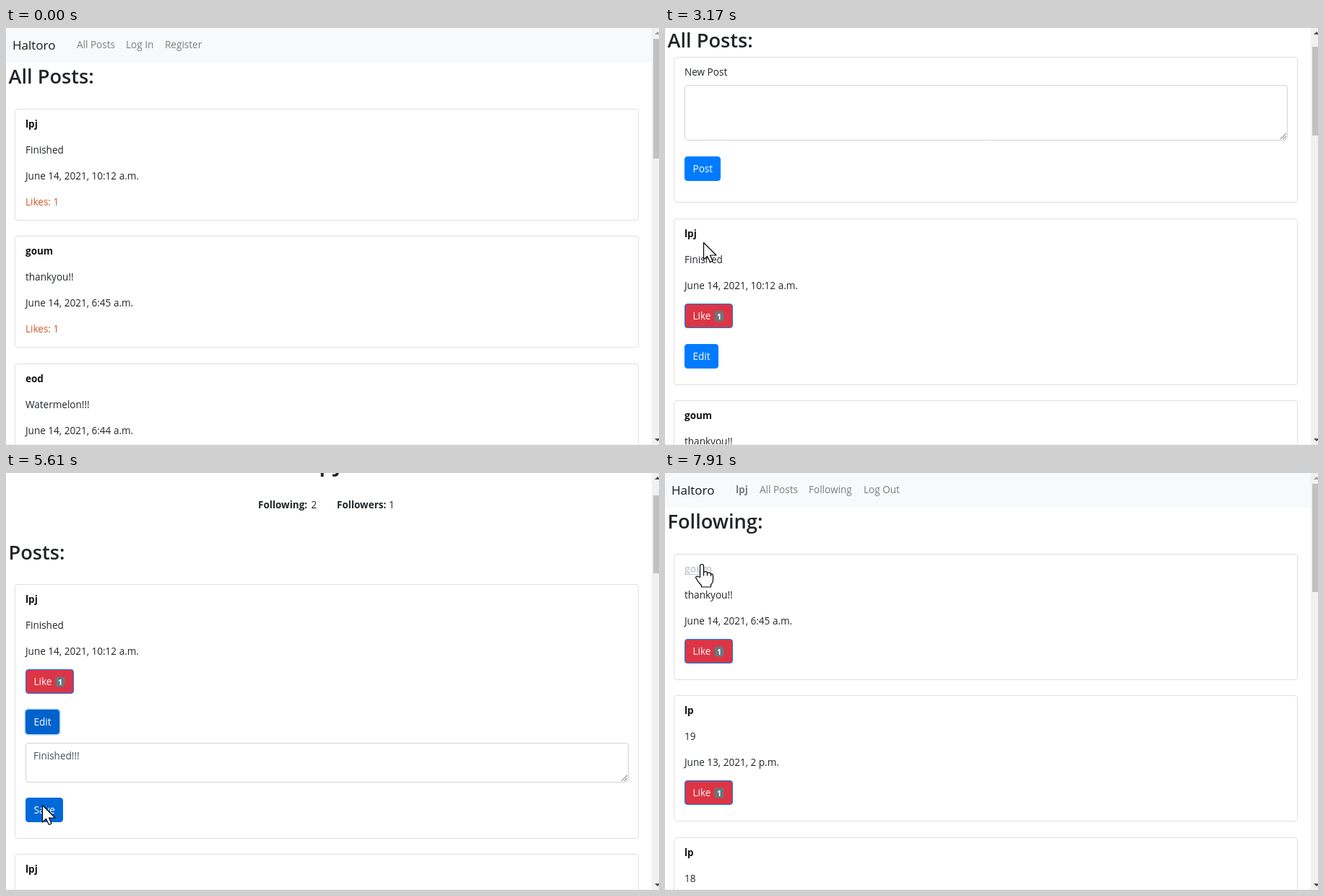
An HTML page with a canvas for the animation above (8 s loop, 904 by 578 pixels).

```html
<!DOCTYPE html>
<html lang="en">
<head>
<meta charset="utf-8">
<title>Social feed walkthrough</title>
<style>
html, body { margin: 0; overflow: hidden; background: #fff; }
canvas { display: block; }
</style>
</head>
<body>
<canvas id="stage" width="904" height="578"></canvas>
<script>
const LOOP = 8000, W = 904, H = 578, NOTCH = 87.4;
const c = document.getElementById('stage').getContext('2d');
const FAMILY = '"Open Sans", "Noto Sans", sans-serif';
const BODY = `13.55px ${FAMILY}`, BOLD = `700 13.5px ${FAMILY}`;
const BRAND = `17px ${FAMILY}`, HEAD = `600 27.2px ${FAMILY}`, TITLE = `600 34px ${FAMILY}`;
const INK = '#212529', BLUE = '#007bff', RED = '#dc3545', GREY = '#6c757d', LINE = '#dfdfdf', FIELD = '#ced4da';
const SITE = 'Haltoro', ME = 'lpj', PAL = 'goum', THIRD = 'eod', OTHER = 'lp';

// Pages: start time, document height (0 = no scrollbar), painter
const pages = [
  [0, 1908, publicFeed], [600, 0, login], [2200, 2575, feed],
  [3800, 2800, profile], [6620, 2575, feed], [7700, 2112, following]
];
// Wheel notches: start time, direction
const wheel = [[3083, 1], [4150, 1], [5980, -1], [6850, 1], [7000, 1], [7260, -1], [7400, -1]];
// Pointer: time, x, y, shape held until the next key
const pointerKeys = [
  [0, 400, 610, 'arrow'], [70, 390, 585, 'arrow'], [480, 182, 22, 'hand'], [700, 182, 22, 'arrow'],
  [860, 137, 100, 'beam'], [1050, 137, 124, 'beam'], [1270, 137, 124, 'arrow'], [1590, 28, 202, 'arrow'],
  [2210, 28, 202, 'arrow'], [2500, 50, 250, 'arrow'], [2720, 50, 250, 'arrow'], [3000, 53, 297, 'arrow'],
  [3200, 53, 297, 'arrow'], [3480, 36, 246, 'hand'], [3800, 36, 246, 'arrow'], [4120, 95, 310, 'arrow'],
  [4370, 95, 325, 'arrow'], [4560, 63, 337, 'arrow'], [5300, 63, 337, 'arrow'], [5600, 50, 460, 'arrow'],
  [5950, 50, 460, 'arrow'], [6360, 89, 25, 'arrow'], [6520, 157, 20, 'hand'], [6660, 157, 20, 'arrow'],
  [7000, 111, 282, 'arrow'], [7400, 111, 282, 'arrow'], [7590, 225, 20, 'hand'], [7720, 225, 20, 'arrow'],
  [7890, 50, 127, 'hand'], [8000, 50, 127, 'hand']
];
const shapes = {
  arrow: new Path2D('M0 0V23.5L5 19L9 27L12.5 25.5L9 17.5H17.5Z'),
  hand: new Path2D('M-2 17V2q0-3 2.5-3t2.5 3v8q4-2 5 1 4-1 5 1.5 3-.5 3 3v5q0 4-3 7v3H0v-2q-5-5-8-11 1-3 4-1zM3 10v5M8 11v4M13 12.5v3'),
  beam: new Path2D('M-7-11h5l2 1 2-1h5M0-11V12M-7 12h5l2-1 2 1h5')
};
const EDIT_PRESS = 4580, EDIT_OPEN = 4700, SAVE = 5750, TYPING = [5120, 5190, 5260];

let now = 0, scrollY = 0, pointer;

const ease = p => { p = Math.min(1, Math.max(0, p)); return p * p * (3 - 2 * p); };

function pointerAt(t) {
  const i = pointerKeys.findIndex(k => k[0] > t) - 1;
  const [t0, x0, y0, shape] = pointerKeys[i], [t1, x1, y1] = pointerKeys[i + 1];
  const p = ease((t - t0) / (t1 - t0));
  return { x: x0 + (x1 - x0) * p, y: y0 + (y1 - y0) * p, shape };
}

function text(s, x, y, font = BODY, color = INK, align = 'left') {
  c.font = font; c.fillStyle = color; c.textAlign = align;
  c.fillText(s, x, y);
  return c.measureText(s).width;
}

function rect(x, y, w, h, color) { c.fillStyle = color; c.fillRect(x, y, w, h); }

function box(x, y, w, h, fill, stroke, r = 3.5) {
  c.beginPath(); c.roundRect(x + .5, y + .5, w - 1, h - 1, r);
  if (fill) { c.fillStyle = fill; c.fill(); }
  if (stroke) { c.strokeStyle = stroke; c.lineWidth = 1; c.stroke(); }
}

function link(s, x, y, font, color, hoverColor, underline) {
  c.font = font;
  const w = c.measureText(s).width, py = pointer.y + scrollY;
  const over = pointer.x >= x && pointer.x <= x + w && py > y - 16 && py < y + 5;
  text(s, x, y, font, over ? hoverColor : color);
  if (over && underline) rect(x, y + 2, w, 1, hoverColor);
}

function button(label, y, w, fill = BLUE, border = fill) {
  box(27, y, w, 34, fill, border);
  text(label, 38.5, y + 22, BODY, '#fff');
}

function textarea(y, h) {
  box(27, y, 835, h, '#fff', FIELD);
  c.strokeStyle = '#666'; c.lineWidth = 1; c.beginPath();
  for (const d of [8, 4]) { c.moveTo(860 - d, y + h - 2); c.lineTo(860, y + h - 2 - d); }
  c.stroke();
}

function nav(items, width = 894) {
  rect(0, 0, width, 48, '#f8f9fa');
  text(SITE, 9, 30, BRAND, '#17191c');
  for (const [label, x] of items)
    link(label, x, 28, label === ME ? BOLD : BODY, 'rgba(0,0,0,.5)', 'rgba(0,0,0,.7)');
}
const guestNav = [['All Posts', 98], ['Log In', 166], ['Register', 220]];
const userNav = [[ME, 98], ['All Posts', 131], ['Following', 199], ['Log Out', 275]];

// Draws one post and returns the top of the next one
function card(top, [who, body, date, likes], mode, extra = 0) {
  const bottom = top + { guest: 154.8, plain: 174.8, own: 230.8 }[mode] + extra;
  const y = Math.round(top);
  box(12, y, 864, Math.round(bottom) - y, '#fff', LINE);
  link(who, 27, y + 26, BOLD, '#101214', '#c9cdd1', true);
  text(body, 27, y + 62);
  text(date, 27, y + 98);
  if (mode === 'guest') text('Likes: ' + likes, 27, y + 134, BODY, '#d2582a');
  else {
    button('Like', y + 118, 67, RED, BLUE);
    box(68, y + 128, 14, 15, GREY, null, 3);
    text(likes, 75, y + 139.5, `700 10.5px ${FAMILY}`, '#fff', 'center');
  }
  return bottom + 21.6;
}

const finished = () => [ME, now < SAVE ? 'Finished' : 'Finished!!!', 'June 14, 2021, 10:12 a.m.', 1];
const thanks = [PAL, 'thankyou!!', 'June 14, 2021, 6:45 a.m.', 1];
const melon = [THIRD, 'Watermelon!!!', 'June 14, 2021, 6:44 a.m.', 1];
const older = (who, body, likes) => [who, body, 'June 13, 2021, 2 p.m.', likes];

function publicFeed() {
  nav(guestNav);
  text('All Posts:', 3.5, 77, HEAD);
  let y = 112;
  for (const post of [finished(), thanks, melon]) y = card(y, post, 'guest');
}

function login() {
  nav(guestNav, W);
  text('Login', 3.5, 77, HEAD);
  const name = ME.slice(0, Math.max(0, Math.floor((now - 1240) / 40)));
  const dots = '•'.repeat(Math.min(6, Math.max(0, Math.floor((now - 1450) / 27))));
  const active = now < 1430 ? 0 : 1;
  [['Username', name, 90], ['Password', dots, 139]].forEach(([hint, value, y], i) => {
    const focus = i === active && now < 2050;
    if (focus) rect(0, y - 3, W, 40, '#bfdeff');
    box(-6, y, W + 12, 34, '#fff', focus ? '#80bdff' : FIELD);
    const w = text(value || hint, 6, y + 23, BODY, value ? '#495057' : GREY);
    const lit = now < 1820;
    if (focus && lit) rect(value ? 7 + w : 6, y + 7, 1, 20, '#222');
  });
  const pressed = now > 2000;
  if (pressed) box(-8, 184, 64, 41, '#bfdeff', null, 6);
  box(-6, 187, 59, 35, pressed ? '#0062cc' : now > 1560 ? '#0069d9' : BLUE);
  text('Login', 6, 210, BODY, '#fff');
  text("Don't have an account?", 143, 238, BODY, INK, 'right');
  text('Register here.', 147.5, 238, BODY, BLUE);
}

function feed() {
  nav(userNav);
  text('All Posts:', 3.5, 77, HEAD);
  box(12, 90, 864, 202, '#fff', LINE);
  text('New Post', 27, 116);
  textarea(129, 77);
  button('Post', 228, 50);
  const next = card(314, finished(), 'own');
  button('Edit', 488, 47);
  card(card(next, thanks, 'plain'), melon, 'plain');
}

function profile() {
  nav(userNav);
  text(ME, 443.5, 84, TITLE, INK, 'center');
  text('Following:', 349, 136, BOLD); text('2', 422.5, 136);
  text('Followers:', 458, 136, BOLD); text('1', 530, 136);
  text('Posts:', 3.5, 207, HEAD);
  const editing = now >= EDIT_OPEN && now < SAVE;
  const next = card(241, finished(), 'own', editing ? 122 : now >= SAVE ? 22 : 0);
  const pressed = now >= EDIT_PRESS && now < SAVE;
  if (pressed) box(25, 413, 51, 38, '#a6d0ff', null, 5);
  button('Edit', 415, 47, pressed ? '#0062cc' : BLUE);
  if (editing) {
    textarea(461, 55);
    const typed = 'Finished' + '!'.repeat(TYPING.filter(t => t <= now).length);
    const w = text(typed, 38, 484, BODY, '#495057');
    if (now < 5300) rect(39 + w, 470, 1, 18, '#222');
    button('Save', 537, 52, now > 5580 ? '#0069d9' : BLUE);
  }
  card(next, older(ME, '21! Edit 1: >_< Edit 2: *__*', 2), 'own');
  button('Edit', Math.round(next) + 174, 47);
}

function following() {
  nav(userNav);
  text('Following:', 3.5, 77, HEAD);
  let y = 112;
  for (const post of [thanks, older(OTHER, '19', 1), older(OTHER, '18', 1)]) y = card(y, post, 'plain');
}

function triangle(y, dir, color) {
  c.fillStyle = color; c.beginPath();
  c.moveTo(898, y + 2 * dir); c.lineTo(906, y + 2 * dir); c.lineTo(902, y - 2 * dir); c.fill();
}

function scrollbar(docHeight) {
  rect(894, 0, 10, H, '#f1f1f1');
  rect(896, Math.round(15 + scrollY * 548 / docHeight), 8, Math.round(548 * H / docHeight), '#c1c1c1');
  triangle(7, 1, scrollY > 0 ? '#505050' : '#a3a3a3');
  triangle(571, -1, '#505050');
}

function drawPointer() {
  c.save();
  c.translate(Math.round(pointer.x) + .5, Math.round(pointer.y) + .5);
  c.lineJoin = 'round';
  c.strokeStyle = '#000';
  c.lineWidth = pointer.shape === 'beam' ? 2 : 1.2;
  c.fillStyle = '#fff';
  if (pointer.shape !== 'beam') c.fill(shapes[pointer.shape]);
  c.stroke(shapes[pointer.shape]);
  c.restore();
}

function draw(t) {
  now = t;
  pointer = pointerAt(t);
  const [start, docHeight, paint] = pages.filter(p => p[0] <= t).pop();
  scrollY = 0;
  for (const [at, dir] of wheel)
    if (at >= start && at <= t) scrollY += dir * NOTCH * ease((t - at) / 160);
  scrollY = Math.max(0, Math.round(scrollY));
  rect(0, 0, W, H, '#fff');
  c.save();
  c.translate(0, -scrollY);
  paint();
  c.restore();
  const grown = paint === profile ? (t >= SAVE ? 22 : t >= EDIT_OPEN ? 122 : 0) : 0;
  if (docHeight) scrollbar(docHeight + grown);
  rect(0, 577, W, 1, '#ededed');
  drawPointer();
}

const begin = performance.now();
function tick() {
  draw((performance.now() - begin) % LOOP);
  requestAnimationFrame(tick);
}
tick();
</script>
</body>
</html>
```
